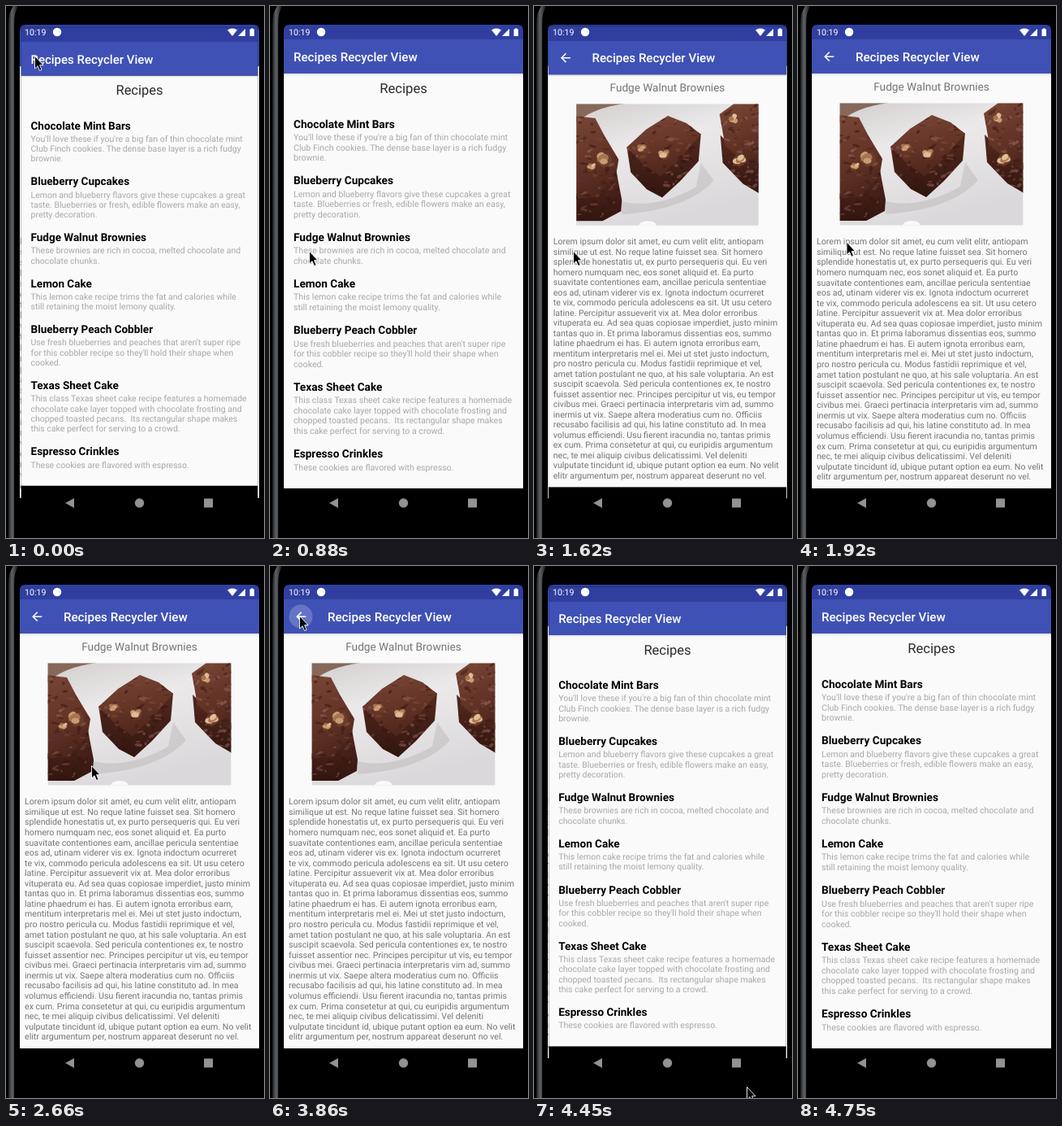
Animation of 318 by 654 pixels, one loop 5350 ms. Source, as an HTML page:

```html
<!DOCTYPE html>
<html lang="en">
<head>
<meta charset="utf-8">
<title>Recipes</title>
<style>
  html, body { margin: 0; width: 100%; height: 100%; overflow: hidden; background: #000; }
  svg { display: block; width: 318px; height: 654px; }
  text { font-family: Roboto, sans-serif; white-space: pre; text-rendering: geometricPrecision; }
</style>
</head>
<body>
<svg id="stage" viewBox="0 0 318 654">
  <defs>
    <clipPath id="screenClip"><path d="M17 654V30q0-7 7-7H305q7 0 7 7V654Z"/></clipPath>
    <clipPath id="photoClip"><rect x="51.600" y="119.500" width="225.800" height="150"/></clipPath>
    <linearGradient id="edge">
      <stop offset="0" stop-color="#1c1d1f"/><stop offset=".35" stop-color="#5d6064"/>
      <stop offset=".7" stop-color="#3a3c3f"/><stop offset="1" stop-color="#0b0b0c"/>
    </linearGradient>
    <linearGradient id="shade" x2="0" y2="1">
      <stop offset="0" stop-opacity=".12"/><stop offset="1" stop-opacity="0"/>
    </linearGradient>
    <linearGradient id="plate" x2=".4" y2="1">
      <stop offset="0" stop-color="#d2cecd"/><stop offset=".4" stop-color="#ebe9ea"/>
      <stop offset="1" stop-color="#dad8da"/>
    </linearGradient>
    <linearGradient id="cake" x2=".3" y2="1">
      <stop offset="0" stop-color="#7a4838"/><stop offset=".6" stop-color="#643427"/>
      <stop offset="1" stop-color="#4f271d"/>
    </linearGradient>
    <linearGradient id="crust" x2="0" y2="1">
      <stop offset="0" stop-color="#54291f"/><stop offset="1" stop-color="#32150f"/>
    </linearGradient>
  </defs>
  <rect width="318" height="654"/>
  <path d="M3 654V22Q3 8 9 0H15Q10 8 10 22V654Z" fill="url(#edge)"/>
  <g clip-path="url(#screenClip)">
    <g id="pages"></g>
    <g fill="#fff">
      <text x="23" y="36.300" font-size="10.600">10:19</text>
      <circle cx="63" cy="32" r="5.200"/>
      <path d="M273 29.500Q279 25.500 285 29.500L279 37Z"/>
      <path d="M286 37L295 28V37Z"/>
      <path d="M300.500 28.500H302V27.500H304.500V28.500H306V37H300.500Z"/>
    </g>
    <g fill="#929292">
      <path d="M73 611L84 605V617Z"/>
      <circle cx="164.500" cy="611" r="5.700"/>
      <rect x="244" y="605.500" width="11" height="11" rx=".6"/>
    </g>
  </g>
  <path id="cursor" d="M.5 .5V16L4 12.700 6.500 18.500 9 17.500 6.600 11.700H11Z" stroke="#fff" stroke-width=".9"/>
</svg>
<script>
const LOOP = 5350;
const DP = 0.7525;
const SP = 0.7585;
const CENTER = { x: 164.5, y: 308 };
const LINE = 12.56;
const pages = document.getElementById('pages');
const cursor = document.getElementById('cursor');

const recipes = [
  ['Chocolate Mint Bars', 'You\'ll love these if you\'re a big fan of thin chocolate mint|Club Finch cookies. The dense base layer is a rich fudgy|brownie.'],
  ['Blueberry Cupcakes', 'Lemon and blueberry flavors give these cupcakes a great|taste. Blueberries or fresh, edible flowers make an easy,|pretty decoration.'],
  ['Fudge Walnut Brownies', 'These brownies are rich in cocoa, melted chocolate and|chocolate chunks.'],
  ['Lemon Cake', 'This lemon cake recipe trims the fat and calories while|still retaining the moist lemony quality.'],
  ['Blueberry Peach Cobbler', 'Use fresh blueberries and peaches that aren\'t super ripe|for this cobbler recipe so they\'ll hold their shape when|cooked.'],
  ['Texas Sheet Cake', 'This class Texas sheet cake recipe features a homemade|chocolate cake layer topped with chocolate frosting and|chopped toasted pecans.  Its rectangular shape makes|this cake perfect for serving to a crowd.'],
  ['Espresso Crinkles', 'These cookies are flavored with espresso.']
];

const lorem = `Lorem ipsum dolor sit amet, eu cum velit elitr, antiopam
similique ut est. No reque latine fuisset sea. Sit homero
splendide honestatis ut, ex purto persequeris qui. Eu veri
homero numquam nec, eos sonet aliquid et. Ea purto
suavitate contentiones eam, ancillae pericula sententiae
eos ad, utinam viderer vis ex. Ignota indoctum ocurreret
te vix, commodo pericula adolescens ea sit. Ut usu cetero
latine. Percipitur assueverit vix at. Mea dolor erroribus
vituperata eu. Ad sea quas copiosae imperdiet, justo minim
tantas quo in. Et prima laboramus dissentias eos, summo
latine phaedrum ei has. Ei autem ignota erroribus eam,
mentitum interpretaris mel ei. Mei ut stet justo indoctum,
pro nostro pericula cu. Modus fastidii reprimique et vel,
amet tation postulant ne quo, at his sale voluptaria. An est
suscipit scaevola. Sed pericula contentiones ex, te nostro
fuisset assentior nec. Principes percipitur ut vis, eu tempor
civibus mei. Graeci pertinacia interpretaris vim ad, summo
inermis ut vix. Saepe altera moderatius cum no. Officiis
recusabo facilisis ad qui, his latine constituto ad. In mea
volumus efficiendi. Usu fierent iracundia no, tantas primis
ex cum. Prima consetetur at qui, cu euripidis argumentum
nec, te mei aliquip civibus delicatissimi. Vel deleniti
vulputate tincidunt id, ubique putant option ea eum. No velit
elitr argumentum per, nostrum appareat deserunt no vel.`;

const text = (x, y, sp, fill, content, extra = '') =>
  `<text x="${x}" y="${y.toFixed(2)}" font-size="${sp * SP}" fill="${fill}" ${extra}>${content}</text>`;

const lines = (x, y, fill, rows) =>
  rows.map((row, i) => text(x, y + i * LINE, 14, fill, row)).join('');

function pageFrame(titleX, content) {
  const band = (y, height, fill) => `<rect x="17" y="${y}" width="295" height="${height}" fill="${fill}"/>`;
  return band(23, 680, '#000') + band(23, 18.2, '#303f9f') + band(83, 510, '#fafafa') +
    band(83, 3, 'url(#shade)') + band(41, 42, '#3f51b5') +
    text(titleX, 67.8, 20, '#fff', 'Recipes Recycler View', 'font-weight="500"') + content;
}

function listContent() {
  let y = 149.8;
  let out = text(CENTER.x, 107, 22, '#2b2b2b', 'Recipes', 'text-anchor="middle"');
  for (const [title, description] of recipes) {
    const rows = description.split('|');
    out += text(29, y, 18, '#000', title, 'font-weight="700"') + lines(29, y + 15.2, '#a8a8a8', rows);
    y += 32 + rows.length * LINE;
  }
  return out;
}

function photo() {
  let seed = 7;
  const random = () => (seed = seed * 16807 % 2147483647) / 2147483647;
  const pick = colors => colors[Math.floor(random() * colors.length)];
  const cakes = [
    { top: 'M40 133L75 137 86 158 104 188 101 206 78 234 40 238Z', side: 'M40 230L78 232 101 202 108 238 107 252 84 264 40 264Z', box: [46, 132, 60, 134] },
    { top: 'M114 173L138 151 165 134 188 143 206 157 181 186 156 209 134 193Z', side: 'M114 172L135 191 156 205 206 156 203 190 180 215 158 235 139 225 119 204Z', box: [112, 134, 94, 100] },
    { top: 'M229 132L250 117H285V205L260 192 236 171Z', side: 'M230 158L255 183 285 196V234L258 218 233 192Z', box: [228, 118, 52, 112] }
  ];
  const walnuts = [[86, 187, 10, 8], [70, 197, 6, 4], [134, 174, 8, 5], [160, 181, 7, 6], [254, 188, 9, 7], [246, 137, 6, 7]];
  const blob = (x, y, rx, ry, fill, opacity = 1) =>
    `<ellipse cx="${x}" cy="${y}" rx="${rx}" ry="${ry}" fill="${fill}" opacity="${opacity}" transform="rotate(${random() * 70 - 45} ${x} ${y})"/>`;
  const crumbs = ([x, y, w, h]) => Array.from({ length: 110 }, () =>
    blob(x + random() * w, y + random() * h, 1 + random() * 4, .6 + random() * 1.6, pick(['#94675a', '#7f4a3b', '#35150f', '#3d1c15']), .5)).join('');
  const walnut = ([x, y, rx, ry]) => blob(x, y + 1, rx, ry, '#6b3d28') + Array.from({ length: 6 }, () =>
    blob(x + (random() - .5) * rx, y + (random() - .5) * ry, rx * .5, ry * .45, pick(['#a87450', '#c99b72', '#e0bd96']))).join('');
  const brownie = ({ top, side, box }, i) => `<clipPath id="cake${i}"><path d="${top}${side}"/></clipPath>
    <path d="${side}" fill="url(#crust)"/><path d="${top}" fill="url(#cake)"/>
    <g clip-path="url(#cake${i})">${crumbs(box)}</g>`;
  return `<g clip-path="url(#photoClip)">
    <rect x="51" y="119" width="228" height="152" fill="url(#plate)"/>
    <path d="M51 119H112Q72 124 51 143Z" fill="#87685a"/>
    <path d="M108 240Q150 250 200 222L206 192 222 214Q190 250 108 256Z" fill="#b5aeb0" opacity=".4"/>
    ${cakes.map(brownie).join('')}${walnuts.map(walnut).join('')}
    <ellipse cx="140" cy="270" rx="11" ry="6" fill="#fafafa"/></g>`;
}

function detailContent() {
  return `<circle id="ripple" cx="38" cy="62" r="14.500" fill="#fff" opacity="0"/>
    <path transform="translate(29.200 53.300) scale(${DP})" fill="#fff" d="M20 11H7.830l5.590-5.590L12 4l-8 8 8 8 1.410-1.410L7.830 13H20z"/>
    ${text(CENTER.x, 103.7, 18, '#757575', 'Fudge Walnut Brownies', 'text-anchor="middle"')}
    ${photo()}${lines(23, 293.3, '#757575', lorem.split('\n'))}`;
}

pages.innerHTML = `<g id="list">${pageFrame(29, listContent())}</g><g id="detail">${pageFrame(71, detailContent())}</g>`;
const list = document.getElementById('list');
const detail = document.getElementById('detail');
const ripple = document.getElementById('ripple');

const transitions = [
  { start: -170, enter: list, exit: detail },
  { start: 1400, enter: detail, exit: list },
  { start: 4262, enter: list, exit: detail }
];

const ticks = [0, 150, 300, 450, 590, 730, 880, 1470, 1620, 1770, 1920, 2070, 2210, 2360, 2510,
  2660, 2810, 2960, 3110, 3260, 3560, 3860, 4010, 4160, 4300, 4450, 4600, 4750];

const cursorPath = [[0, 35, 61], [880, 48, 301], [1620, 48, 301], [2660, 105, 245], [3260, 36, 61],
  [4010, 36, 61], [4300, 222, 510], [4450, 262, 640], [4600, 275, 700], [LOOP, 275, 700]];

const clamp = v => Math.min(1, Math.max(0, v));
const bezier = (a, b, c, d, u) => {
  const v = 1 - u;
  return a * v * v * v + 3 * b * u * v * v + 3 * c * u * u * v + d * u * u * u;
};

// Android's "fast out, extra slow in" curve.
function emphasized(x) {
  if (x <= 0 || x >= 1) return clamp(x);
  const [xs, ys] = x < .166
    ? [[0, .05, .133, .166], [0, 0, .06, .4]]
    : [[.166, .208, .25, 1], [.4, .82, 1, 1]];
  let low = 0, high = 1;
  for (let i = 0; i < 24; i++) {
    const mid = (low + high) / 2;
    if (bezier(...xs, mid) < x) low = mid; else high = mid;
  }
  return bezier(...ys, low);
}

function scalePage(page, s) {
  page.setAttribute('transform', `translate(${CENTER.x * (1 - s)} ${CENTER.y * (1 - s)}) scale(${s})`);
}

function placeCursor(t) {
  const i = Math.max(1, cursorPath.findIndex(key => key[0] >= t));
  const [t0, x0, y0] = cursorPath[i - 1];
  const [t1, x1, y1] = cursorPath[i];
  const u = clamp((t - t0) / (t1 - t0));
  const e = u * u * (3 - 2 * u);
  cursor.setAttribute('transform', `translate(${x0 + (x1 - x0) * e} ${y0 + (y1 - y0) * e})`);
}

function render(time) {
  const t = ticks.findLast(tick => tick <= time);
  const { start, enter, exit } = transitions.findLast(item => item.start <= t);
  const age = t - start;
  const p = emphasized(age / 400);

  if (pages.lastElementChild !== enter) pages.append(enter);
  scalePage(enter, .85 + .15 * p);
  scalePage(exit, 1 + .045 * p);
  enter.setAttribute('opacity', clamp((age - 50) / 83));
  exit.setAttribute('opacity', 1);
  enter.setAttribute('visibility', 'visible');
  exit.setAttribute('visibility', p < 1 ? 'visible' : 'hidden');

  ripple.setAttribute('opacity', t >= 3860 && t < 4300 ? .2 * clamp(1 - (t - 3860) / 350) : 0);
  placeCursor(t);
}

const begin = performance.now();
function frame() {
  render((performance.now() - begin) % LOOP);
  requestAnimationFrame(frame);
}
frame();
</script>
</body>
</html>
```
